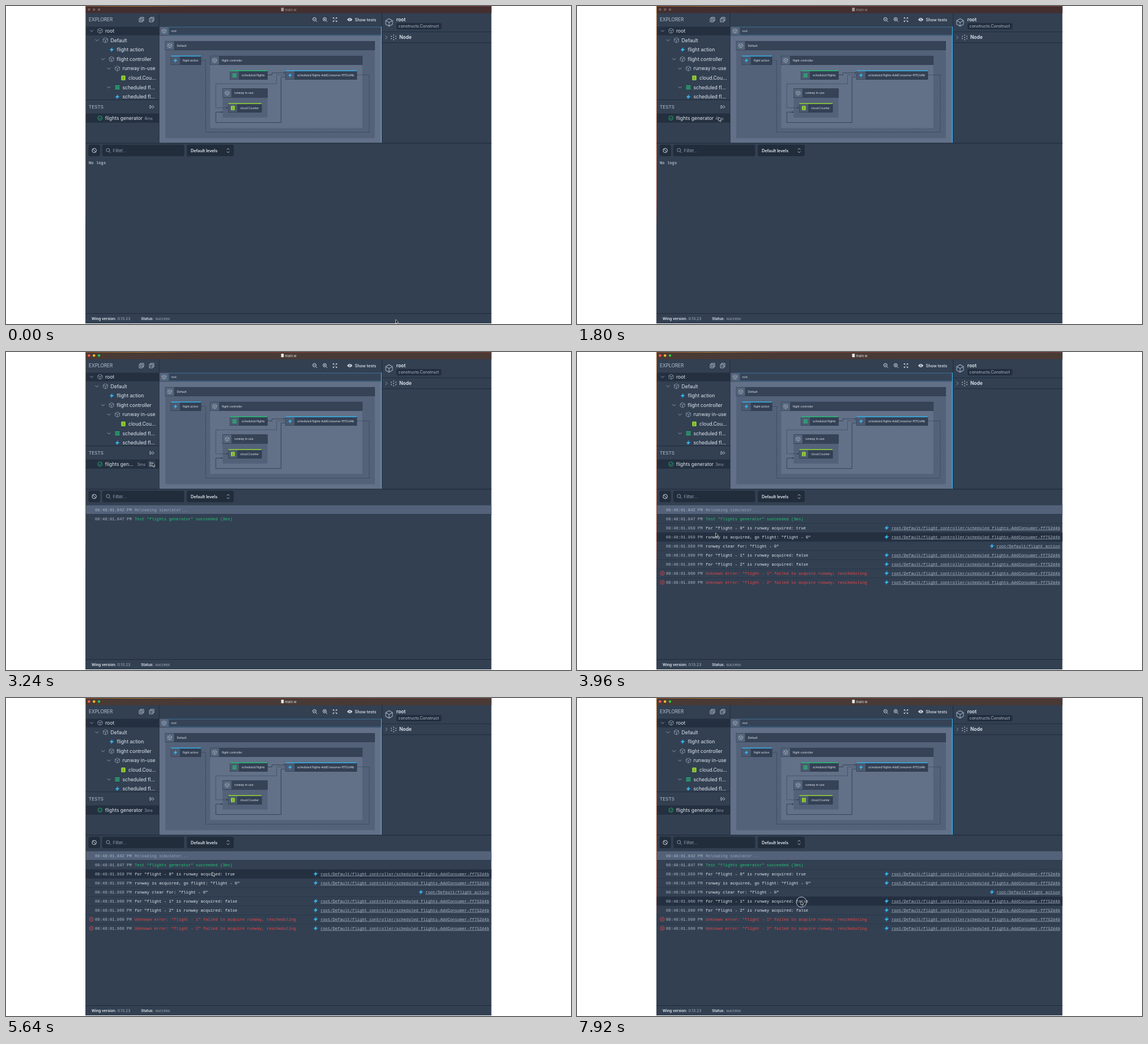
An HTML page for the animation above (8 s loop, 997 by 561 pixels).

```html
<!DOCTYPE html>
<html lang="en">
<head>
<meta charset="utf-8">
<style>
html, body { margin: 0; width: 100%; height: 100%; overflow: hidden; background: #fff; }
svg { display: block; width: 997px; height: 561px; font-family: Inter, sans-serif; }
text { white-space: pre; }
.mono { font-family: "Liberation Mono", monospace; }
</style>
</head>
<body>
<svg id="stage" viewBox="0 0 997 561"></svg>
<script>
const C = {
  bg: '#324052', dark: '#243040', line: '#202b3a', mid: '#536279', map: '#627188',
  text: '#e2e8f0', soft: '#94a3b8', blue: '#38b6f1', green: '#22c574', lime: '#a3e635', red: '#ef4444'
};
const L = 140.5, W = 716;
const stage = document.getElementById('stage');

const rect = (x, y, w, h, fill, extra = '') =>
  `<rect x="${x}" y="${y}" width="${w}" height="${h}" fill="${fill}" ${extra}/>`;
const path = (d, stroke, width = 0.8, extra = '') =>
  `<path d="${d}" fill="none" stroke="${stroke}" stroke-width="${width}" ${extra}/>`;
const circle = (x, y, r, fill, extra = '') =>
  `<circle cx="${x}" cy="${y}" r="${r}" fill="${fill}" ${extra}/>`;
const text = (x, y, s, size, fill = C.text, extra = '') =>
  `<text x="${x}" y="${y}" font-size="${size}" fill="${fill}" ${extra}>${s}</text>`;
const mono = (x, y, s, fill, extra = '') => text(x, y, s, 7.2, fill, 'class="mono" ' + extra);
const group = (id, body, extra = '') => `<g id="${id}" ${extra}>${body}</g>`;
const at = (x, y, k, body) => `<g transform="translate(${x} ${y}) scale(${k})">${body}</g>`;

// Icons, centred on x, y
const cube = (x, y, k = 1, color = C.soft) => at(x, y, k,
  path('M0 -4.4L4 -2.2V2.2L0 4.4L-4 2.2V-2.2ZM-4 -2.2L0 0L4 -2.2M0 0V4.4', color, 0.8, 'stroke-linejoin="round"'));
const bolt = (x, y, k = 1) => at(x, y, k, `<path d="M1.4 -4.4L-4 1H-.6L-1.6 4.4L4 -1H.6Z" fill="${C.blue}"/>`);
const queue = (x, y, k = 1) => at(x, y, k, path('M-4 -2.8H4M-4 0H4M-4 2.8H4', C.green, 1.5));
const counter = (x, y, k = 1) => at(x, y, k, rect(-3.6, -4.2, 7.2, 8.4, C.lime, 'rx="1"') +
  path('M-2 -2H2M-2 .3H2M-2 2.4H2', '#4b6b25', 0.9));
const down = (x, y) => path(`M${x - 3} ${y - 1.5}l3 3l3 -3`, C.soft, 0.9);
const right = (x, y) => path(`M${x - 1.5} ${y - 3}l3 3l-3 3`, C.soft, 0.9);
const copies = (x, y, mark) => path(`M${x - 2} ${y - 2}v-2h6v6h-2M${x - 4} ${y - 2}h6v6h-6zM${x - 2.5} ${y + 1}h3${mark}`, '#cbd5e1', 0.8);
const zoom = (x, y, plus) => circle(x - 0.7, y - 0.7, 3, 'none', `stroke="${C.text}" stroke-width=".9"`) +
  path(`M${x + 1.5} ${y + 1.5}l2.6 2.6M${x - 2.2} ${y - 0.7}h3` + (plus ? `M${x - 0.7} ${y - 2.2}v3` : ''), C.text, 0.8);

function titleBar() {
  const bar = (back, lights, ink) => rect(L, 0, W, 12.7, back) + rect(L, 0, W, 0.8, 'url(#edge)') +
    lights.map((c, i) => circle(146.5 + i * 8.8, 6.2, 2.2, c)).join('') +
    rect(485.5, 3, 4.6, 6.2, ink, 'rx=".6"') + text(492.3, 8.5, 'main.w', 6, ink);
  return group('blurred', bar('#432f2f', ['#735a58', '#735a58', '#735a58'], '#a09896')) +
    group('focused', bar('#493a35', ['#fc5b57', '#fdbb2e', '#29c741'], '#e7e7e8'));
}

function explorer() {
  const icons = { cube, bolt, queue, counter };
  const rows = [
    ['root', 175, 'cube', 1], ['Default', 184.5, 'cube', 1], ['flight action', 195.5, 'bolt', 0],
    ['flight controller', 195.2, 'cube', 1], ['runway in-use', 205.5, 'cube', 1], ['cloud.Cou...', 216, 'counter', 0],
    ['scheduled fl...', 205.5, 'queue', 1], ['scheduled fl...', 205.5, 'bolt', 0]
  ];
  let s = text(146, 26.6, 'EXPLORER', 8.3, '#b4c0cf') + copies(239, 24, 'm-1.5 -1.5v3') + copies(257, 24, '') +
    rect(141, 36.5, 129, 15.2, C.dark);
  rows.forEach(([label, x, icon, open], i) => {
    const y = 43.8 + i * 16.62;
    s += icons[icon](x - 9, y) + text(x, y + 3.1, label, 8.6) + (open ? down(x - 24, y) : '');
  });
  return s;
}

function tests() {
  return rect(141, 165, 129, 76, C.bg) + rect(141, 165, 129, 1, C.line) +
    text(146, 181, 'TESTS', 8.2, '#b4c0cf') + path('M254 175.2l4 2.8l-4 2.8zM258 175.2l3.2 2.8l-3.2 2.8', '#cbd5e1') +
    rect(141, 189.5, 129, 16.3, C.dark) +
    circle(165.8, 197.8, 3.8, 'none', `stroke="${C.green}" stroke-width=".8"`) + path('M163.9 197.9l1.5 1.5l2.6 -3', C.green) +
    group('fullName', text(174.8, 200.9, 'flights generator', 8.5)) +
    group('shortName', text(174.8, 200.9, 'flights gen...', 8.5) +
      rect(250.5, 191.5, 13, 12.5, '#324052', 'rx="2"') + path('M254 194.4l6 3.6l-6 3.6z', '#cbd5e1', 0.9)) +
    text(244, 200.6, '', 7.3, C.soft, 'id="took"');
}

function diagram() {
  const box = (x, y, w, h, fill, label) => rect(x, y, w, h, fill) +
    rect(x, y, w, 15.5, '#364357', 'stroke="#2a3648" stroke-width=".6"') + rect(x + 0.4, y + 0.4, 15, 14.7, '#56657b') +
    cube(x + 8, y + 7.8, 0.85, '#b4c0cf') + text(x + 20.5, y + 9.5, label, 5);
  const leaf = (x, y, w, icon, color, label) => rect(x, y, w, 15.5, '#334054', 'stroke="#263244" stroke-width=".6"') +
    rect(x + 0.3, y + 0.5, 15.5, 14.7, '#4b5a70') + rect(x, y - 0.6, w, 1.4, color) +
    icon(x + 8, y + 8, 0.9) + text(x + 20.7, y + 9.7, label, 5);
  const wire = (d, dashed) => path(d, '#2b384b', 0.8, dashed ? 'stroke-dasharray="1.7 1.2"' : '');
  const tip = (x, y) => `<path d="M${x} ${y}l-3 -1.5v3z" fill="#2b384b"/>`;
  return rect(270.4, 36.2, 392.6, 205.3, C.map) +
    box(271, 36.4, 391.5, 205, C.map, 'root') +
    path('M287 37.2H662M287 51.2H662M287 37V51.4', '#4385ad', 0.7) + rect(661.8, 36.4, 1.4, 205.1, C.blue) +
    box(281, 62.2, 369.7, 171, C.mid, 'Default') +
    box(360.3, 88.2, 268.5, 127, C.map, 'flight controller') +
    box(382.3, 145.8, 79, 51, C.mid, 'runway in-use') +
    wire('M344 96H352.3V222.6H641V121.6H619', true) +
    wire('M493 121.6H477.5V137.3H370.2V179.6H389', true) +
    wire('M461 121.6H469.3V118H491') +
    wire('M493 125.2H485.3V205.6H370.2V187.2H382') +
    tip(493, 118) + tip(392, 179.6) + tip(382.5, 187.2) +
    leaf(291, 88.2, 53, bolt, C.blue, 'flight action') +
    leaf(395.2, 114.2, 66, queue, C.green, 'scheduled flights') +
    leaf(493.2, 114.2, 125.8, bolt, C.blue, 'scheduled flights-AddConsumer-ff752d4b') +
    leaf(392.3, 172, 58.7, counter, C.lime, 'cloud.Counter');
}

function toolbar() {
  return zoom(545, 24) + zoom(563, 24, true) +
    path('M577.2 22.3v-1.8h1.8m3 0h1.8v1.8m0 3.4v1.8h-1.8m-3 0h-1.8v-1.8M577.4 20.7l2.2 2.2m4 -2.2l-2.2 2.2m2.2 4.4l-2.2 -2.2m-4 2.2l2.2 -2.2', C.text, 0.9) +
    `<path d="M602 24Q606.6 17.8 611.2 24Q606.6 30.2 602 24Z" fill="${C.text}"/>` + circle(606.6, 24, 1.8, C.bg) + circle(606.6, 24, 0.9, C.text) +
    text(615.5, 26.6, 'Show tests', 7.2, C.text, 'font-weight="500"');
}

function inspector() {
  const dots = [[0, 0], [0, -4], [0, 4], [4, -2], [4, 2], [-4, -2], [-4, 2]];
  return cube(676, 29, 1.5) + text(688.8, 27, 'root', 8.4, C.text, 'font-weight="600"') +
    rect(689, 30, 79.5, 11.3, '#222e3e', 'rx="3"') + text(692.3, 38.2, 'constructs.Construct', 7.25, '#b4c0cf') +
    rect(664, 45.2, 192.5, 0.9, C.line) + right(671, 55.4) +
    dots.map(([x, y]) => circle(684 + x, 55.4 + y, 0.9, '#b4c0cf')).join('') +
    text(694, 58.3, 'Node', 8.4, C.text, 'font-weight="600"') + rect(664, 64.3, 192.5, 0.9, C.line);
}

function filterBar() {
  const field = (x, w) => rect(x, 245.2, w, 19.3, '#222d3c', 'rx="2.5" stroke="#1c2634" stroke-width=".6"');
  return field(146, 19.4) + field(170.3, 143.5) + field(319.5, 81.8) +
    circle(155.7, 254.9, 3.8, 'none', `stroke="${C.text}" stroke-width=".9"`) + path('M153 252.2l5.4 5.4', C.text, 0.9) +
    circle(179.8, 254.2, 3, 'none', `stroke="${C.soft}" stroke-width=".9"`) + path('M182 256.4l2.7 2.7', C.soft, 0.9) +
    text(188.8, 257.6, 'Filter...', 7.4, C.soft) +
    text(326, 257.6, 'Default levels', 7.2, C.text, 'font-weight="600"') +
    path('M389.8 253.4l2.2 -2.2l2.2 2.2M389.8 256.6l2.2 2.2l2.2 -2.2', '#cbd5e1', 0.9);
}

const rowY = i => 270.4 + i * 16;
const fn = 'root/Default/flight controller/scheduled flights-AddConsumer-ff752d4b';
const asked = (n, ok) => `for "flight - ${n}" is runway acquired: ${ok}`;
const failed = n => `Unknown error: "flight - ${n}" failed to acquire runway, rescheduling`;
const logs = [
  ['01.842', 'Reloading simulator...', C.soft],
  ['01.847', 'Test "flights generator" succeeded (3ms)', C.green],
  ['01.959', asked(0, true), C.text, fn],
  ['01.959', 'runway is acquired, go flight: "flight - 0"', C.text, fn],
  ['01.959', 'runway clear for: "flight - 0"', C.text, 'root/Default/flight action'],
  ['01.960', asked(1, false), C.text, fn],
  ['01.960', asked(2, false), C.text, fn],
  ['01.960', failed(1), C.red, fn],
  ['01.960', failed(2), C.red, fn]
];

function logRow([time, message, color, link], i) {
  const y = rowY(i), mid = y + 7.9, base = y + 10.3;
  let s = i ? rect(L, y - 0.3, W, 0.7, '#27344a') : rect(L, y, W, 15.4, C.mid);
  if (color === C.red) {
    s += circle(150.5, mid, 3.5, 'none', `stroke="${C.red}" stroke-width=".8"`) +
      path(`M149.2 ${mid - 1.3}l2.6 2.6m0 -2.6l-2.6 2.6`, C.red);
  }
  s += mono(157, base, `09:48:${time} PM`, '#a9b6c6') + mono(227, base, message, color);
  if (link) {
    s += bolt(844.5 - link.length * 4.32, mid) +
      mono(852.5, base, link, '#a9b6c6', 'text-anchor="end" text-decoration="underline"');
  }
  return s;
}

stage.innerHTML = `<defs><linearGradient id="edge"><stop offset="0" stop-color="#a5532c"/><stop offset=".13" stop-color="#b88232"/>
  <stop offset=".3" stop-color="#8e3c32"/><stop offset="1" stop-color="#7b3a3d"/></linearGradient>
  <linearGradient id="side" x2="0" y2="1"><stop offset="0" stop-color="#b06f30"/><stop offset=".6" stop-color="#a04438"/>
  <stop offset=".7" stop-color="#39404f"/></linearGradient></defs>` +
  rect(L, 0, W, 560, C.bg) + titleBar() + explorer() + tests() + diagram() + toolbar() + inspector() +
  rect(269.7, 12.7, 0.8, 228.8, C.line) + rect(663.2, 12.7, 0.9, 228.8, C.line) + rect(L, 241.4, W, 1.1, C.line) +
  filterBar() + group('empty', mono(146, 278.6, 'No logs', C.text)) +
  rect(L, 0, W, 15.5, C.dark, 'id="hover"') +
  group('first', logs.slice(0, 2).map(logRow).join('')) +
  group('rest', logs.slice(2).map((row, i) => logRow(row, i + 2)).join('')) +
  rect(L, 542, W, 1, C.line) +
  text(151, 554.2, 'Wing version:', 6.5, C.text, 'font-weight="600"') + text(196.8, 554.2, '0.13.23', 6.8, '#a9b6c6') +
  text(238.3, 554.2, 'Status:', 6.5, C.text, 'font-weight="600"') + text(263.6, 554.2, 'success', 6.6, '#a9b6c6') +
  rect(140.2, 0, 0.9, 560, 'url(#side)') +
  group('cursor', circle(1, 2, 9, 'rgba(20,28,40,.25)', 'id="ring" stroke="#c3ccd8" stroke-width="1"') +
    '<path d="M0 0V7.2L1.7 5.7L2.8 8.2L4 7.7L2.9 5.3H5.2Z" fill="#111" stroke="#e8ebef" stroke-width=".7"/>');

const $ = id => document.getElementById(id);
const show = (id, on) => $(id).setAttribute('display', on ? 'inline' : 'none');

// time, x, y of the pointer tip
const trail = [
  [0, 687.5, 553], [520, 687.5, 553], [1600, 262, 205], [1800, 250, 196], [2200, 254, 196], [2860, 258, 195],
  [3300, 258, 195], [3960, 244.5, 319], [4350, 232, 308], [5640, 364, 307], [6080, 402, 309],
  [6520, 396.8, 327], [6640, 396.8, 327], [7180, 352, 342], [7280, 352, 342], [7840, 395, 358], [8000, 395, 358]
];

function pointer(t) {
  const i = Math.max(1, trail.findIndex(p => p[0] > t));
  const [t0, x0, y0] = trail[i - 1], [t1, x1, y1] = trail[i];
  const k = (t - t0) / (t1 - t0), e = k * k * (3 - 2 * k);
  return [x0 + (x1 - x0) * e, y0 + (y1 - y0) * e];
}

function draw(t) {
  const [x, y] = pointer(t);
  const focus = t >= 2360, logged = t >= 3160, more = t >= 3360;
  const overTest = focus && x < 270 && y > 189 && y < 206;
  $('cursor').setAttribute('transform', `translate(${x.toFixed(2)} ${y.toFixed(2)})`);
  show('ring', (t >= 2320 && t < 2440) || (t >= 3040 && t < 3160) || t >= 7880);
  show('focused', focus);
  show('blurred', !focus);
  show('shortName', overTest);
  show('fullName', !overTest);
  $('took').textContent = logged ? '3ms' : '4ms';
  $('took').setAttribute('x', overTest ? 231.3 : 244);
  show('empty', !logged);
  show('first', logged);
  show('rest', more);
  const row = Math.floor((y - rowY(0)) / 16);
  show('hover', more && row > 0 && row < logs.length);
  $('hover').setAttribute('y', rowY(row));
}

const start = performance.now();
function tick() {
  draw((performance.now() - start) % 8000);
  requestAnimationFrame(tick);
}
draw(0);
requestAnimationFrame(tick);
</script>
</body>
</html>
```
